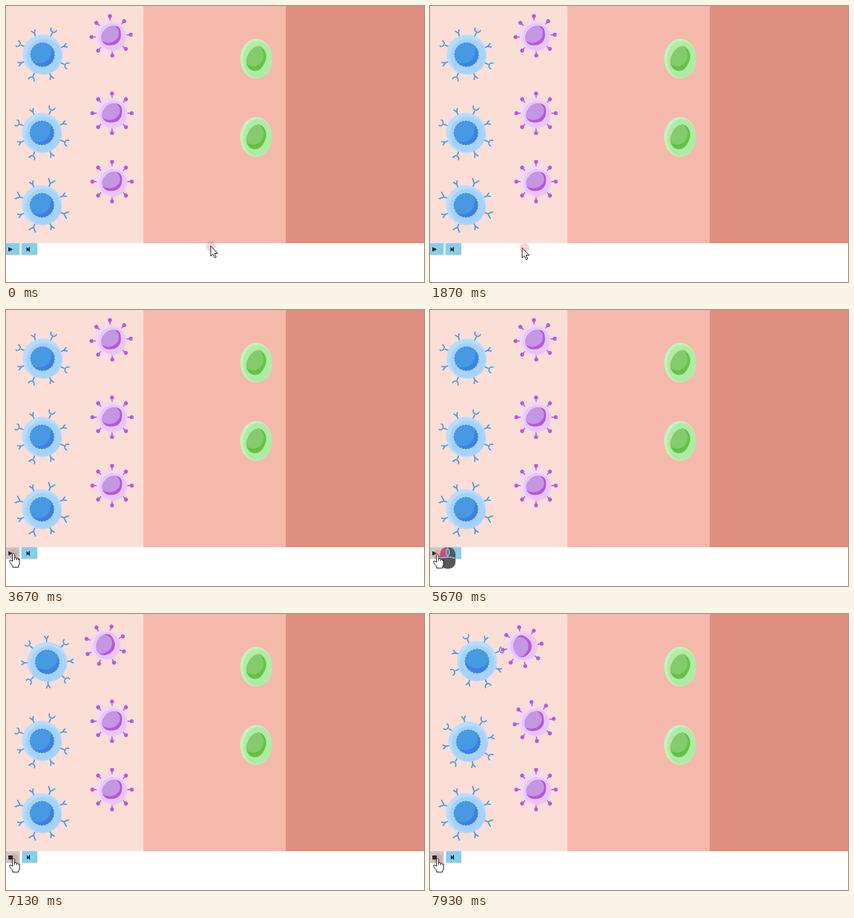
Recreate the animation shown at these times as an HTML page. Size 680 by 448 pixels, loop 8 s.

```html
<!DOCTYPE html>
<html lang="en">
<head>
<meta charset="utf-8">
<title>Cells</title>
<style>
html, body { margin: 0; width: 100%; height: 100%; overflow: hidden; background: #fff; }
svg { display: block; width: 680px; height: 448px; }
text { font: 12px "Open Sans", sans-serif; fill: #575757; }
</style>
</head>
<body>
<svg id="stage" viewBox="0 0 680 448">
  <defs>
    <path id="gear"/>
    <path id="bean" d="M4 -16C10 -16.500 16 -13 16 -6C16 0 17 5 11 11C7 15 0 16 -5 15C-12 14 -16 9 -16 3C-16 -3 -13 -7 -9 -11C-5 -15 0 -16 4 -16Z"/>
    <path id="seed" d="M3 -20C9 -20.500 13 -16 15.500 -9C18 -2 15 4 12 10C9 16 4 20 -2 20C-9 20 -14 15 -16 8C-17 1 -14 -5 -11 -10C-8 -15 -3 -19.500 3 -20Z"/>
    <clipPath id="inGear"><use href="#gear"/></clipPath>
    <clipPath id="inBean"><use href="#bean"/></clipPath>
    <clipPath id="inSeed"><use href="#seed"/></clipPath>
  </defs>
  <rect width="224" height="385" fill="#fbded6"/>
  <rect x="223.500" width="232" height="385" fill="#f5b9ab"/>
  <rect x="455" width="225" height="385" fill="#df8e80"/>
  <g id="cells"></g>

  <rect id="playBtn" y="385" width="22.500" height="19"/>
  <rect id="nextBtn" y="385" height="19" fill="#87ceeb"/>
  <path id="playIcon" d="M4 391.500L11 395L4 398.500Z"/>
  <path id="stopIcon" d="M4 392H11V398.500H4Z"/>
  <path id="nextIcon" d="M33.500 391.500L37 395L33.500 398.500ZM36.800 391.500H38.500V398.500H36.800Z"/>
  <circle id="halo" r="8" fill="#e06e6e" fill-opacity=".28"/>

  <g id="mouse">
    <path d="M16.500 403V398Q17 385 29 385Q41 385 41.500 398V408Q41 420 29 420Q17 420 16.500 408Z" fill="#55585b"/>
    <path d="M16.500 403V398Q17 385 29 385V403Z" fill="#cb4a76"/>
    <path d="M16.500 403Q29 399 41.500 403M29 385V389M29 398V401" fill="none" stroke="#7fd3ec" stroke-width="1.500"/>
    <rect x="26.500" y="388.500" width="5" height="9.500" rx="2.500" fill="#557f92" stroke="#7fd3ec" stroke-width="1.300"/>
  </g>
  <g id="tip">
    <rect x=".5" y=".5" width="125" height="21" fill="#fff" stroke="#767676"/>
    <text x="6" y="15">Start/Stop animation</text>
  </g>
  <g id="cursor" fill="#fff" stroke="#000" stroke-linejoin="round">
    <path id="arrow" d="M.5 .5V17L4.300 13.500L7 19.700L9.500 18.600L6.800 12.500H11.800Z"/>
    <g id="hand">
      <path d="M-1.500 2Q.2 -1 2 2V8Q4 6.500 5.500 8.500Q7.500 7.500 8.500 9.500Q10.500 9 10 11.500V16Q10 19 8.500 20.500V23H-1V21Q-4 17.500 -6 14Q-6.500 11 -4 11.500L-1.500 13.500Z"/>
      <path fill="none" d="M2 8V11.500M5.500 8.500V11.500M8.500 9.500V11.500"/>
    </g>
  </g>
</svg>
<script>
const $ = id => document.getElementById(id);
const LOOP = 8000, FPS = 15;

// Nucleus with a scalloped rim
const rim = Array.from({ length: 144 }, (_, i) => {
  const a = i * Math.PI / 72, r = 19.6 + 0.6 * Math.cos(24 * a);
  return (r * Math.cos(a)).toFixed(2) + ' ' + (r * Math.sin(a)).toFixed(2);
});
$('gear').setAttribute('d', 'M' + rim.join('L') + 'Z');

const ring = draw => Array.from({ length: 8 }, (_, i) =>
  `<g transform="rotate(${i * 45})">${draw(i)}</g>`).join('');

const nucleus = (shape, clip, dark, light, glow) =>
  `<use href="#${shape}" fill="${dark}"/><g clip-path="url(#${clip})">` +
  `<ellipse ${glow} fill="${light}"/></g>`;

function blueCell(fork) {
  const spikes = ring(i =>
    `<path d="${i % 2 ? 'M31 0H38M42 -3.200L37 0L42 2.800' : 'M31 0H38' + fork}"/>`);
  return `<g transform="rotate(-69)" fill="none" stroke="#459ae2" stroke-width="2" stroke-linecap="round">${spikes}</g>` +
    '<circle r="32.500" fill="#b6dcff"/><circle cx="2.500" cy="2.500" r="29" fill="#a5d3fe"/>' +
    nucleus('gear', 'inGear', '#3c82e0', '#459ae2', 'cx="-6.500" cy="-6.500" rx="21" ry="21"');
}

function purpleCell() {
  const spikes = ring(() => '<path d="M24 0H32" stroke="#bb58df" stroke-width="1.800"/><circle cx="32" r="3.200" fill="#bb58df"/>');
  return spikes + '<circle r="25" fill="#f0d6fc"/><circle cx="2" cy="2" r="22.200" fill="#e8c6f8"/>' +
    nucleus('bean', 'inBean', '#b957dd', '#c497e2', 'cx="-4" cy="-4" rx="17" ry="15"');
}

const greenCell = () =>
  '<ellipse rx="26" ry="32.500" fill="#c6f2be"/><ellipse cx="2.300" cy="1.500" rx="23.700" ry="30.500" fill="#b0eba5"/>' +
  nucleus('seed', 'inSeed', '#62c43f', '#83cb6b', 'cx="-5" cy="-6" rx="17" ry="18.500"');

const U = 'M45 -4.800A4.800 4.800 0 1 0 45 4.800';
const V = 'M44.500 -5.500L38 0L44.500 5.500';

// Each pose is [x, y, turn]; a pair moves from one pose to the other
const cells = [
  { art: blueCell(U), from: [59.5, 79, 3], to: [76.5, 76.5, 45], pair: 0 },
  { art: purpleCell(), from: [171, 48.5, -3.5], to: [150, 53, -54], pair: 0 },
  { art: blueCell(U), from: [58.5, 206, 0.5], to: [62.5, 207.5, 13], pair: 1 },
  { art: purpleCell(), from: [172.5, 174, 0], to: [169.5, 174.5, -8], pair: 1 },
  { art: blueCell(V), from: [58.5, 323.5, 0] },
  { art: purpleCell(), from: [172.5, 285, 0] },
  { art: greenCell(), from: [407, 85.5, 0] },
  { art: greenCell(), from: [407, 212.5, 0] }
];
$('cells').innerHTML = cells.map(c => `<g>${c.art}</g>`).join('');
cells.forEach((c, i) => c.el = $('cells').children[i]);

// Pointer path: [step, x, y]
const path = [
  [12, 332.5, 389], [25, 179, 391], [28, 149.5, 392], [38, 20, 395],
  [39, 14, 394], [40, 10, 391.5], [50, 10, 391.5], [51, 11, 393],
  [54, 11, 393], [55, 12, 394.5], [59, 12, 395], [60, 12, 396]
];

const lerp = (a, b, p) => a + (b - a) * p;
const clamp = p => Math.max(0, Math.min(1, p));
const show = (id, on) => $(id).style.display = on ? '' : 'none';
const move = (el, x, y, turn = 0) =>
  el.setAttribute('transform', `translate(${x} ${y}) rotate(${turn})`);

function pointer(n) {
  let i = 1;
  while (i < path.length - 1 && n > path[i][0]) i++;
  const a = path[i - 1], b = path[i];
  const p = clamp((n - a[0]) / (b[0] - a[0]));
  return [lerp(a[1], b[1], p), lerp(a[2], b[2], p)];
}

function render(t) {
  const n = Math.floor((t + 4) * FPS / 1000);
  const running = n >= 103, hover = n >= 39;

  const progress = [clamp((n - 102) / 11), clamp((n - 117) / 2)];
  for (const c of cells) {
    const pose = c.to ? c.from.map((v, k) => lerp(v, c.to[k], progress[c.pair])) : c.from;
    move(c.el, ...pose);
  }

  $('playBtn').setAttribute('fill', hover ? '#c9c9c9' : '#87ceeb');
  $('nextBtn').setAttribute('x', running ? 26 : 25);
  $('nextBtn').setAttribute('width', running ? 25 : 26);
  $('nextIcon').setAttribute('fill', running ? '#000050' : '#000');
  move($('nextIcon'), running ? 0.5 : 0, 0);
  show('playIcon', !running);
  show('stopIcon', running);

  const [x, y] = pointer(n);
  const [hx, hy] = pointer(n - 0.38);
  move($('cursor'), x, y);
  move($('halo'), hx + 0.5, hy + 1);
  show('arrow', !hover);
  show('hand', hover);

  show('tip', (n >= 48 && n < 51) || (n >= 68 && n < 84));
  move($('tip'), n < 60 ? 9 : 11, n < 60 ? 412 : 417);
  show('mouse', n >= 84 && !running);
  $('mouse').setAttribute('opacity', n === 84 ? 0.5 : 1);
}

const start = performance.now();
function tick() {
  render((performance.now() - start) % LOOP);
  requestAnimationFrame(tick);
}
tick();
</script>
</body>
</html>
```
